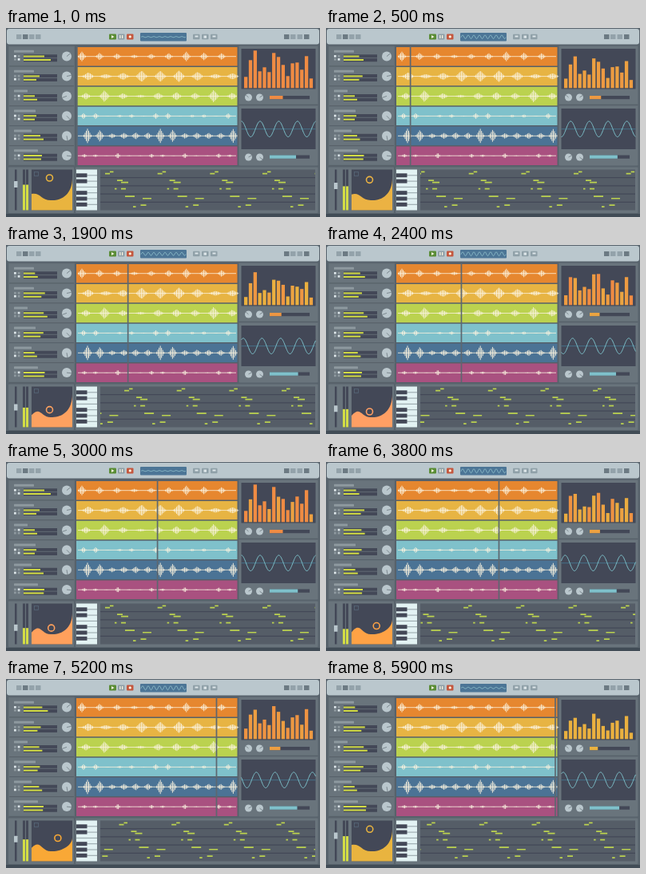
An HTML page with a canvas that plays this animation: 393 by 237 pixels, repeating every 6 s.

```html
<!DOCTYPE html>
<html>
<head>
<meta charset="utf-8">
<style>
html, body { margin: 0; width: 100%; height: 100%; overflow: hidden; background: #58636c; }
canvas { display: block; }
</style>
</head>
<body>
<canvas id="stage" width="393" height="237"></canvas>
<script>
const c = document.getElementById('stage').getContext('2d');
const LOOP = 6;
const DARK = '#434857', LIGHT = '#bac7cd', LIME = '#d3dd45', CREAM = '#fbf3df';
const ORANGE = [239, 139, 67], YELLOW = [233, 180, 63];

const clamp = v => Math.max(0, Math.min(1, v));
const mix = (a, b, k) => a + (b - a) * k;
const blend = (a, b, k) => `rgb(${a.map((v, i) => Math.round(mix(v, b[i], k)))})`;
const ease = k => k * k * (3 - 2 * k);

function box(x, y, w, h, color, r = 0) {
  c.fillStyle = color;
  c.beginPath();
  c.roundRect(x, y, w, h, r);
  c.fill();
}

function line(points, color, width = 1) {
  c.strokeStyle = color;
  c.lineWidth = width;
  c.beginPath();
  points.forEach(([x, y]) => c.lineTo(x, y));
  c.stroke();
}

function knob(x, y, r, angle) {
  c.fillStyle = LIGHT;
  c.beginPath();
  c.arc(x, y, r, 0, 7);
  c.fill();
  line([[x, y], [x + r * Math.cos(angle), y + r * Math.sin(angle)]], '#7b878e');
}

function wave(x0, x1, y, amp, length, crest, color) {
  const points = [];
  for (let x = x0; x <= x1; x += 0.5)
    points.push([x, y - amp * Math.cos((x - crest) / length * 2 * Math.PI)]);
  line(points, color);
}

function toolbar(t) {
  box(1, 1, 391, 19.5, LIGHT, 3);
  [13, 21, 29, 37].forEach((x, i) => box(x, 8, 6.5, 6, i == 1 ? '#6c7a83' : '#93a2aa'));
  [348, 356, 364.5, 373].forEach((x, i) => box(x, 8, 6.5, 6, i % 3 ? '#93a2aa' : '#6c7a83'));
  box(129, 7.5, 9, 7, '#598c35', 1);
  c.fillStyle = CREAM;
  c.beginPath();
  c.moveTo(132, 9); c.lineTo(135.5, 11); c.lineTo(132, 13);
  c.fill();
  box(140, 7.5, 8.5, 7, '#8fa0a8', 1);
  box(142.2, 9, 1.3, 4, CREAM);
  box(145, 9, 1.3, 4, CREAM);
  box(151, 7.5, 8.5, 7, '#c4573e', 1);
  box(153.7, 9.3, 3.2, 3.2, CREAM, 1.6);
  box(168, 6, 58, 10.5, '#4c7596', 1);
  const amp = 0.5 + 2 * Math.sin(t % 1.5 / 1.5 * Math.PI);
  wave(169, 225, 11.2, amp, 7, 171, '#8cbcc9');
  [234, 245, 256].forEach((x, i) => {
    box(x, 7.8, 8.5, 6.5, '#8fa0a8', 1);
    box(x + 2.5, 9.5, i == 1 ? 3.5 : 4, i == 1 ? 3.2 : 2, '#dce5e8');
  });
}

// Meter widths: start of each cycle, end of each cycle, period
const meters = [
  [26, 34, 13, 16, 1], [20, 16, 27.5, 23, 1], [14, 17, 28, 33, 0.5],
  [16, 14, 27, 23, 0.5], [21, 25, 13, 16, 1], [23, 22, 29, 28.5, 1.2]
];
const labels = [25, 25, 17, 27, 22, 30];

function mixer(t) {
  box(3, 22.5, 83, 150, '#646f77', 1);
  meters.forEach(([a0, b0, a1, b1, period], i) => {
    const y = 24 + i * 24.9, k = t % period / period;
    box(4, y, 81, 23.3, '#69747c');
    line([[4, y + 23.9], [85, y + 23.9]], '#586169');
    box(10, y + 3.8, labels[i], 3, '#8e999f', 0.5);
    for (let j = 0; j < 4; j++)
      box(10 + j % 2 * 4.7, y + 10 + (j >> 1) * 4, 2.8, 2.7, (i + j) % 3 ? '#8e999f' : '#dce5e8');
    box(22, y + 9.2, 42, 9, DARK);
    box(22, y + 10.5, mix(a0, a1, k), 2, LIME);
    box(22, y + 15, mix(b0, b1, k), 2, LIME);
    line([[22, y + 13.6], [64, y + 13.6]], '#626b74');
    knob(76, y + 11.6, 6, [-0.7, -0.2, 2.8, 0.8, 1.4, 0.1][i]);
  });
}

// Track colour, first burst, spacing, half-width, pattern of burst heights
const tracks = [
  ['#e6872f', 95, 21.8, 4.5, [6, 5]],
  ['#e7b443', 102, 22.8, 7, [8.5, 7, 8]],
  ['#bbd24f', 100, 22.8, 6, [4, 8, 6]],
  ['#7fc1cb', 97, 15.1, 3, [3.5, 4, 0.5]],
  ['#4b7395', 102, 15.2, 4.5, [9, 8, 5]],
  ['#a95180', 98, 14, 2.4, [5, 4, 0.5, 4, 0.5, 0.5]]
];

function arrangement(t) {
  box(87, 22.5, 203.5, 150, '#566069');
  tracks.forEach(([color, start, step, half, heights], i) => {
    const y = 24 + i * 24.9, mid = y + 11.7;
    box(88, y, 201.5, 23.4, color);
    line([[90, mid], [288, mid]], CREAM, 0.8);
    for (let x = start, n = 0; x < 288; x += step, n++)
      for (let d = -half; d <= half; d += 1.5) {
        const jag = 0.7 + 0.3 * Math.cos(d * 4 + n);
        const h = heights[n % heights.length] * (1 - Math.abs(d) / (half + 1)) * jag;
        line([[x + d, mid - h], [x + d, mid + h]], CREAM, 0.9);
      }
  });
  box(88 + 201.5 * t / LOOP, 23, 1.7, 149, '#5d676f');
}

const barHeights = [14, 35, 47, 21, 26, 20, 44, 39, 29, 15, 31, 32, 23, 40, 12];
const barPeriods = [1, 1.2, 1.5, 1, 1, 1.2, 1, 1.2, 1.5, 1, 1.2, 1, 1.5, 1, 1.2];

function effects(t) {
  box(291.5, 22.5, 99, 150, '#69747c', 1);
  line([[291.5, 96.5], [390.5, 96.5]], '#566069', 1.5);
  box(294.5, 26, 93, 50.5, DARK);
  barHeights.forEach((full, i) => {
    const p = t % barPeriods[i], h = full * (1 - 0.31 * p);
    box(298 + i * 5.84, 75.3 - h, 4.3, h, blend(ORANGE, YELLOW, p / barPeriods[i]));
  });
  knob(303.5, 87, 4.5, -2.4);
  knob(317.5, 87, 4.5, -0.6);
  box(330, 85, 50, 4.2, DARK);
  const k = t % 1.5 / 1.5;
  box(330, 85, mix(16.5, 9.8, k), 4.2, blend(ORANGE, YELLOW, k));

  box(294.5, 101, 93, 51, DARK);
  line([[294.5, 126.7], [387.5, 126.7]], '#467b96', 0.8);
  wave(294.5, 387.5, 126.7, 9.8, 23.4, 318 - t * 23.4, '#7ec2cb');
  knob(303.5, 162, 4.5, -0.5);
  knob(317.5, 162, 4.5, 0.7);
  box(330, 159.5, 50, 4.2, DARK);
  box(330, 159.5, 33 + 3.7 * (t % 1.2), 4.2, '#7fc1cb');
}

// Cursor x, cursor y, edge heights and colour of the pad at each stop
const stops = [
  [0, [54.5, 188, 208, 206, 188, 233, 180, 63]],
  [2.4, [54.5, 209, 214, 201, 187, 255, 159, 100]],
  [4.8, [68.5, 203.5, 213, 198, 203, 255, 164, 51]],
  [6, [54.5, 188, 208, 206, 188, 233, 180, 63]]
];

function pad(t) {
  const n = t < 2.4 ? 0 : t < 4.8 ? 1 : 2;
  const [[from, a], [to, b]] = [stops[n], stops[n + 1]];
  const k = ease((t - from) / (to - from));
  const [x, y, left, bulge, right, ...rgb] = a.map((v, i) => mix(v, b[i], k));
  const color = blend(rgb, rgb, 0);
  box(32, 177.5, 51, 51, DARK);
  c.strokeStyle = '#566678';
  c.lineWidth = 0.8;
  c.strokeRect(35.5, 180.5, 5, 5);
  c.fillStyle = color;
  c.beginPath();
  c.moveTo(32, left);
  c.bezierCurveTo(43, bulge, 44, 216, 56, 216);
  c.bezierCurveTo(69, 217, 83, 209, 83, right);
  c.lineTo(83, 228.5);
  c.lineTo(32, 228.5);
  c.fill();
  c.strokeStyle = color;
  c.lineWidth = 1.6;
  c.beginPath();
  c.arc(x, y, 4, 0, 7);
  c.stroke();
}

function fader(t) {
  box(3, 174.5, 82, 57.5, '#69747c', 1);
  const y = mix(196, 210, t < 3.6 ? t / 3.6 : (LOOP - t) / 2.4);
  box(11, 177.5, 2.5, 51, DARK);
  box(10, y - 4, 4.5, 8, LIGHT, 0.5);
  [21, 25].forEach(x => {
    box(x, 177.5, 3, 51, DARK);
    const top = clamp((y - 177.5) / 51) * 51 + 178;
    box(x, top, 3, 228.5 - top, LIME);
  });
}

// Offset, height on the roll and length of each note in the phrase
const notes = [
  [0, 182.5, 6], [6, 180.3, 4.5], [15, 191, 7], [20, 193.5, 9], [12, 201.5, 2.5],
  [20, 201.5, 6], [25, 211, 12], [47, 213.7, 11], [35, 224, 3.5], [44.5, 222, 7]
];

function pianoRoll(t) {
  box(87, 174.5, 303.5, 57.5, '#69747c', 1);
  box(88, 177.5, 26, 51, '#e2f2f3');
  for (let i = 1; i < 7; i++)
    line([[88, 177.5 + i * 7.3], [114, 177.5 + i * 7.3]], '#7f8d94', 0.8);
  [1, 2, 4, 5, 6].forEach(i => box(88, 175 + i * 7.3, 13.5, 5, DARK));
  box(118, 177.5, 269, 51, '#555d67');
  for (let i = 1; i < 5; i++)
    line([[118, 177.5 + i * 10.2], [387, 177.5 + i * 10.2]], DARK, 1.2);
  c.save();
  c.beginPath();
  c.rect(118, 177.5, 269, 51);
  c.clip();
  const phrase = 65.65;
  for (let i = -2; i < 7; i++)
    for (const [x, y, w] of notes)
      box(124 + x + i * phrase - t * phrase / 3, y - 0.8, w, 1.7, '#bbd24f');
  c.restore();
}

function draw(now) {
  const t = now / 1000 % LOOP;
  box(0, 0, 393, 237, '#58636c');
  box(0, 233, 393, 4, '#414c56');
  toolbar(t);
  mixer(t);
  arrangement(t);
  effects(t);
  fader(t);
  pad(t);
  pianoRoll(t);
}

let start;
function tick(now) {
  start ??= now;
  draw(now - start);
  requestAnimationFrame(tick);
}
draw(0);
requestAnimationFrame(tick);
</script>
</body>
</html>
```
